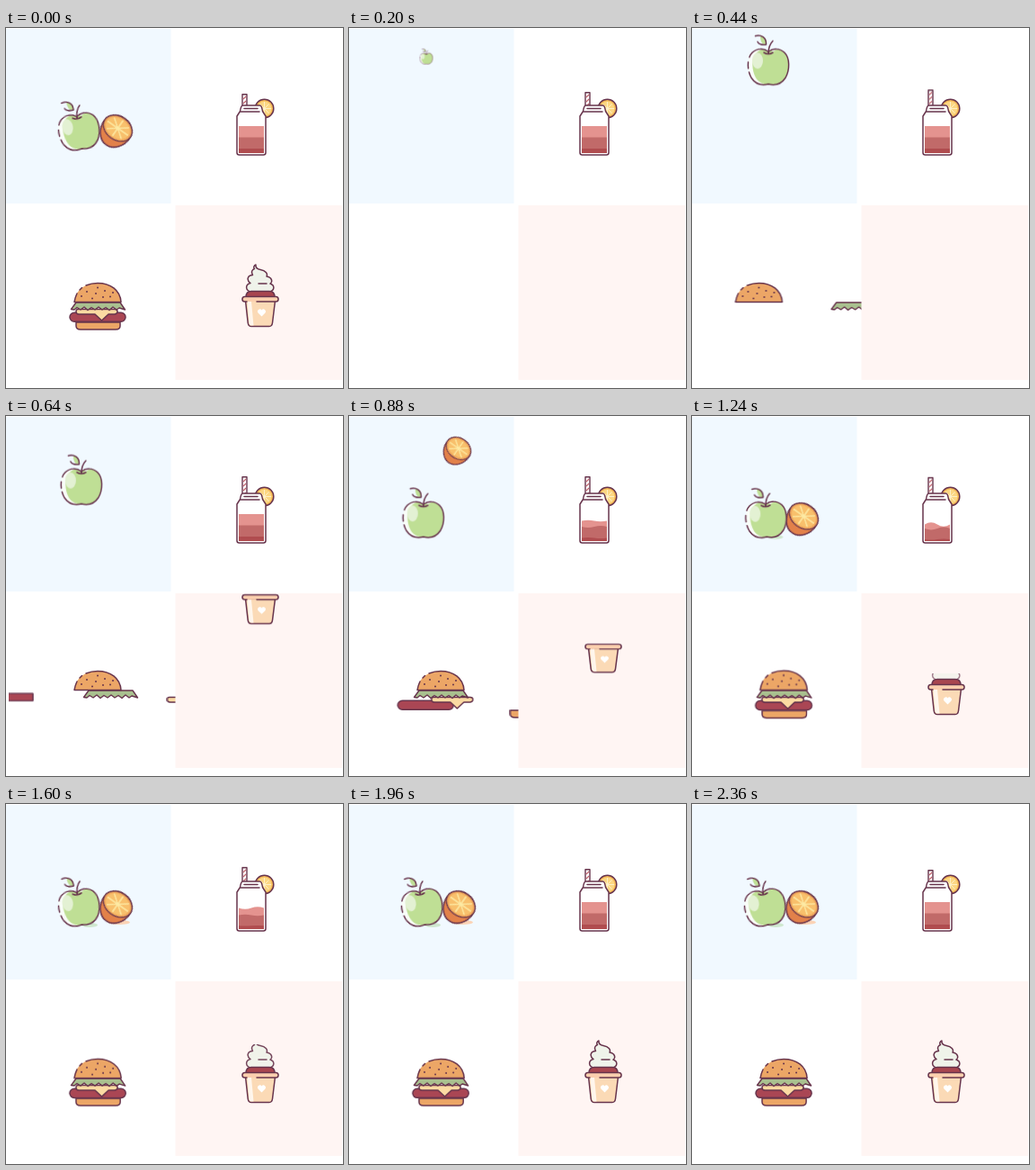
An HTML page for the animation above (2400 ms loop, 375 by 400 pixels).

```html
<!DOCTYPE html>
<html lang="en">
<head>
<meta charset="utf-8">
<title>Food icons</title>
<style>
html, body { margin: 0; width: 100%; height: 100%; overflow: hidden; background: #fff; }
svg { display: block; width: 375px; height: 400px; }
svg * { animation: 2400ms linear infinite; }
.line { stroke: #67344c; stroke-width: 1.5; stroke-linecap: round; stroke-linejoin: round; fill: none; }

/* fruit */
.apple { animation-name: apple; }
@keyframes apple {
  0%, 1.6% { transform: translate(81.5px, 115.3px) rotate(-9deg); }
  1.61%, 5% { transform: translate(86px, 31px) scale(0); }
  8.33% { transform: translate(86px, 34px) scale(.31); }
  16.25% { transform: translate(85px, 43px) scale(1); animation-timing-function: cubic-bezier(.32, 0, .67, 0); }
  29.5%, 48.3% { transform: translate(82.7px, 115.3px) rotate(0deg); }
  51.67% { transform: translate(82.5px, 115.3px) rotate(-2deg); animation-timing-function: ease-out; }
  70%, 100% { transform: translate(81.5px, 115.3px) rotate(-9deg); }
}
.orange { animation-name: orange; }
@keyframes orange {
  0%, 1.6% { transform: translate(122.5px, 114.5px); }
  1.61%, 27.1% { transform: translate(120px, 31px) scale(0); }
  38.33% { transform: translate(120.3px, 40px) scale(1); animation-timing-function: cubic-bezier(.32, 0, .67, 0); }
  51.5%, 100% { transform: translate(122.5px, 114.5px) scale(1); }
}
.shade { transform-box: fill-box; transform-origin: center; }
.shade-a { animation-name: shade-a; }
.shade-o { animation-name: shade-o; }
@keyframes shade-a { 0%, 47% { transform: scale(0); } 52%, 100% { transform: scale(1); } }
@keyframes shade-o { 0%, 54% { transform: scale(0); } 64%, 100% { transform: scale(1); } }

/* drink */
.straw { animation-name: straw; }
@keyframes straw {
  0% { transform: translateY(6px); }
  8.33% { transform: translateY(4px); }
  23.3%, 48.3% { transform: translateY(0); }
  51.67% { transform: translateY(.8px); }
  81.67% { transform: translateY(5px); }
  93%, 100% { transform: translateY(6px); }
}
.top { fill: #e4938f; animation-name: top; }
.mid { fill: #c16a69; animation-name: mid; }
.low { fill: #b04c4f; animation-name: low; }
@keyframes top {
  0%, 26.67%, 79%, 100% { d: path("M259 109Q266 109 273 109T287 109V139H259Z"); }
  36.67% { d: path("M259 116.5Q266 115 273 116.5T287 116.5V139H259Z"); }
  44% { d: path("M259 119Q266 122 273 119T287 119V139H259Z"); }
  51.67% { d: path("M259 120.5Q266 116 273 120.5T287 120.5V139H259Z"); }
  64% { d: path("M259 117Q266 120 273 117T287 117V139H259Z"); }
}
@keyframes mid {
  0%, 26.67%, 79%, 100% { d: path("M259 121.5Q266 121.5 273 121.5T287 121.5V139H259Z"); }
  36.67% { d: path("M259 123Q266 125 273 123T287 123V139H259Z"); }
  44% { d: path("M259 124Q266 121 273 124T287 124V139H259Z"); }
  51.67% { d: path("M259 125Q266 128 273 125T287 125V139H259Z"); }
  64% { d: path("M259 124Q266 122 273 124T287 124V139H259Z"); }
}
@keyframes low {
  0%, 26.67%, 79%, 100% { d: path("M259 134Q266 134 273 134T287 134V139H259Z"); }
  36.67% { d: path("M259 135.5Q266 134.5 273 135.5T287 135.5V139H259Z"); }
  51.67% { d: path("M259 137Q266 138 273 137T287 137V139H259Z"); }
}

/* burger */
.burger { transform-origin: 102px 309px; animation-name: breathe; }
@keyframes breathe {
  0%, 42%, 75%, 100% { transform: scale(1); }
  52% { transform: scale(1.01, 1.02); }
  90% { transform: scale(1.01); }
}
.bun { animation-name: bun; }
.salad { animation-name: salad; }
.cheese { animation-name: cheese; }
.patty { animation-name: patty; }
.patty rect { transform-box: fill-box; animation-name: settle; }
.base { animation-name: base; }
@keyframes bun {
  0%, 1.6% { transform: none; }
  1.61%, 9.17% { transform: translateX(-130px); animation-timing-function: cubic-bezier(.333, .667, .667, 1); }
  26.25%, 100% { transform: translateX(0); }
}
@keyframes salad {
  0%, 1.6% { transform: none; }
  1.61%, 15.54% { transform: translateX(119px); animation-timing-function: cubic-bezier(.333, .667, .667, 1); }
  32.54%, 100% { transform: translateX(0); }
}
@keyframes cheese {
  0%, 1.6% { transform: none; }
  1.61%, 25.54% { transform: translateX(117px); animation-timing-function: cubic-bezier(.333, .667, .667, 1); }
  42.54%, 100% { transform: translateX(0); }
}
@keyframes patty {
  0%, 1.6% { transform: none; }
  1.61%, 24.58% { transform: translateX(-131px); animation-timing-function: cubic-bezier(.333, .667, .667, 1); }
  43.46%, 100% { transform: translateX(0); }
}
@keyframes settle {
  0%, 1.6% { transform: none; rx: 5px; }
  1.61%, 26.67% { transform: translateY(-8px) scaleY(.8); rx: 0px; }
  36%, 100% { transform: translateY(0) scaleY(1); rx: 5px; }
}
@keyframes base {
  0%, 1.6% { transform: none; }
  1.61%, 35.54% { transform: translateX(117px); animation-timing-function: cubic-bezier(.333, .667, .667, 1); }
  52.54%, 100% { transform: translateX(0); }
}

/* ice cream */
.cup { transform-origin: 283px 298px; animation-name: cup; }
@keyframes cup {
  0%, 1.6% { transform: none; }
  1.61%, 20.4% { transform: translateY(-138px); }
  26.67% { transform: translateY(-100px) scaleY(.97); }
  36.67% { transform: translateY(-45px) scaleY(.94); }
  45.5%, 100% { transform: translateY(0) scaleY(1); }
}
.choc { transform-origin: 283px 299px; animation-name: choc; }
@keyframes choc {
  0%, 1.6% { transform: none; }
  1.61%, 45.5% { transform: scaleY(0); }
  50%, 100% { transform: scaleY(1); }
}
.cream { animation-name: cream; }
@keyframes cream {
  0%, 1.6% { clip-path: inset(-5%); opacity: 1; }
  1.61%, 49% { clip-path: inset(100% -5% -5% -5%); opacity: 0; }
  51.67% { clip-path: inset(78% -5% -5% -5%); opacity: .6; }
  72%, 100% { clip-path: inset(-5%); opacity: 1; }
}
</style>
</head>
<body>
<svg viewBox="0 0 375 400">
  <defs>
    <clipPath id="left"><rect x="3" y="270" width="186" height="80"/></clipPath>
    <clipPath id="panel"><rect x="188" y="197" width="186" height="194"/></clipPath>
    <path id="skin" pathLength="100" d="M0-17C5-21 13-21 18-16C24-10 24 3 19 12C15 18 8 21 0 19C-8 21-15 18-19 12C-24 3-24-10-18-16C-13-21-5-21 0-17Z"/>
    <clipPath id="inside"><use href="#skin"/></clipPath>
  </defs>

  <rect y="1" width="183.5" height="194" fill="#f1f9ff"/>
  <ellipse class="shade shade-a" cx="93" cy="134.5" rx="9" ry="2.5" fill="#cfe8cf"/>
  <ellipse class="shade shade-o" cx="126" cy="131.5" rx="12" ry="2.5" fill="#fbd3b6"/>
  <g class="orange">
    <g transform="translate(1.3 -2.3) rotate(35)">
      <path class="line" style="fill:#e2814a" d="M-17.4 0A17.4 14.5 0 0 1 17.4 0A17.4 21.5 0 0 1-17.4 0Z"/>
      <ellipse class="line" style="fill:#f0a75c;stroke-width:1.2" cy="-1" rx="17.2" ry="13.2"/>
      <ellipse cy="-1" rx="14.5" ry="10.800" fill="#f8c06c"/>
      <path d="M-14-1H14M0-11.500V9.500M-10-8.500L10 6.500M-10 6.500L10-8.500" stroke="#fdeaa4" stroke-width="1.5"/>
    </g>
  </g>
  <g class="apple">
    <use href="#skin" fill="#f9fdf8"/>
    <g clip-path="url(#inside)">
      <use href="#skin" x="5" fill="#bfdf95"/>
      <ellipse cx="-12" cy="-7" rx="6" ry="9" fill="#e3f1d3"/>
    </g>
    <use href="#skin" class="line" stroke-dasharray="70 3 5 4 18 0"/>
    <path fill="#bfdf95" d="M-9-34.500C-4-34-2-31-2.500-25C-7-25-9-28-9-34.500Z"/>
    <path class="line" d="M-14.500-34.500C-8-36-2-33-2.500-25C-7-24-11-25.500-12-28"/>
    <path class="line" d="M-5-16Q0-13 5-16M0-15C0-22 2-26 5-29"/>
  </g>

  <g class="straw">
    <rect class="line" style="fill:#fff;stroke-width:1.4" x="263" y="67.7" width="5" height="24"/>
    <path d="M264 73l3-3M264 78l3-3M264 83l3-3M264 88l3-3" stroke="#c0606a" stroke-width="1.2"/>
  </g>
  <circle class="line" style="fill:#f7bb58" cx="287.500" cy="89.500" r="10.300"/>
  <circle cx="287.500" cy="89.500" r="8" fill="#fcd783"/>
  <path d="M287.500 82V97M280 89.500H295M282.500 84.500L292.500 94.500M282.500 94.500L292.500 84.500" stroke="#fef0c6"/>
  <path id="jar" class="line" style="fill:#fff" d="M263.500 86H282.500Q284.500 86 285.500 92.500L289 98V138.500Q289 141 286.500 141H259.500Q257 141 257 138.500V98L260.500 92.500Q261.500 86 263.500 86Z"/>
  <path class="top" d="M259 109H287V139H259Z"/>
  <path class="mid" d="M259 121.500H287V139H259Z"/>
  <path class="low" d="M259 134H287V139H259Z"/>
  <path class="line" d="M265 89.500H280M261 93H282"/>

  <g clip-path="url(#left)">
    <g class="burger">
      <path class="line base" style="fill:#eca666" d="M78 327H127V331Q127 335 122 335H83Q78 335 78 331Z"/>
      <g class="patty"><rect class="line" style="fill:#aa4654" x="71" y="316.300" width="62" height="10" rx="5"/></g>
      <path class="line cheese" style="fill:#fbdaa2" d="M81 312.500H121Q124 312.500 124 315T121 318H114L106.500 325L99 318H81Q78 318 78 315T81 312.500Z"/>
      <path class="line salad" style="fill:#a9c08f;stroke-width:1.4" d="M78 305H127L132.500 313L126 311L123 313L119 310L115 313.500L111 310.500L107 313L103 310L99 313L95 310.500L91 313.500L87 310L83 313L79 310.500L76 313L72.500 312.500Z"/>
      <g class="bun">
        <path fill="#eca666" d="M76 304.500C77 291 88 283.500 102 283.500S127 291 128 304.500Z"/>
        <path class="line" d="M79 295Q77 299 76 304.500H128C127 291 116 283.500 102 283.500Q95 283.500 89 286M82 291l2.500-2.500"/>
        <path class="line" style="stroke-width:2" d="M90 293h0M84 298h0M100 295h0M102 288.500h0M110 292h0M108 299h0M116 298.500h0M96 300.500h0M119 294h0"/>
      </g>
    </g>
  </g>

  <rect x="188.500" y="197" width="185.500" height="194" fill="#fff5f3"/>
  <g clip-path="url(#panel)">
    <g class="cream">
      <path class="line" style="fill:#eff3ea" d="M273 293C266 292 266 285 272 283.500C267 280 269 274.500 274.500 274.500C272 270 275 268 276.500 267.500C275 266 276 264 278 263C277.500 266.500 280 268 283 268.500C289 269.500 291.500 273 290 276C296 277 297 282 294 284C299.500 286 299 292 293 293Z"/>
      <path class="line" d="M281 284H290"/>
    </g>
    <path class="line choc" style="fill:#a9464f" d="M267 299Q267 292.500 273 292.500H293Q299 292.500 299 299Z"/>
    <g class="cup">
      <path class="line" style="fill:#fbdab6" d="M266.500 303L269.200 327.500Q269.700 331.500 273 331.500H293Q296 331.500 296.500 327.500L299.500 303Z"/>
      <path fill="#fff6ec" d="M268.500 304H273L275.500 330.500H273Q271 330.500 270.500 328Z"/>
      <path fill="#fff" d="M284.500 320.500l-4-4a2.300 2.300 0 0 1 4-3a2.300 2.300 0 0 1 4 3z"/>
      <rect x="263" y="298.500" width="40" height="5.500" rx="2.700" fill="#fbcfae"/>
      <path class="line" d="M279 304H300.300A2.700 2.700 0 0 0 300.300 298.500H265.700A2.700 2.700 0 0 0 265.700 304H268"/>
    </g>
  </g>
</svg>
</body>
</html>
```
